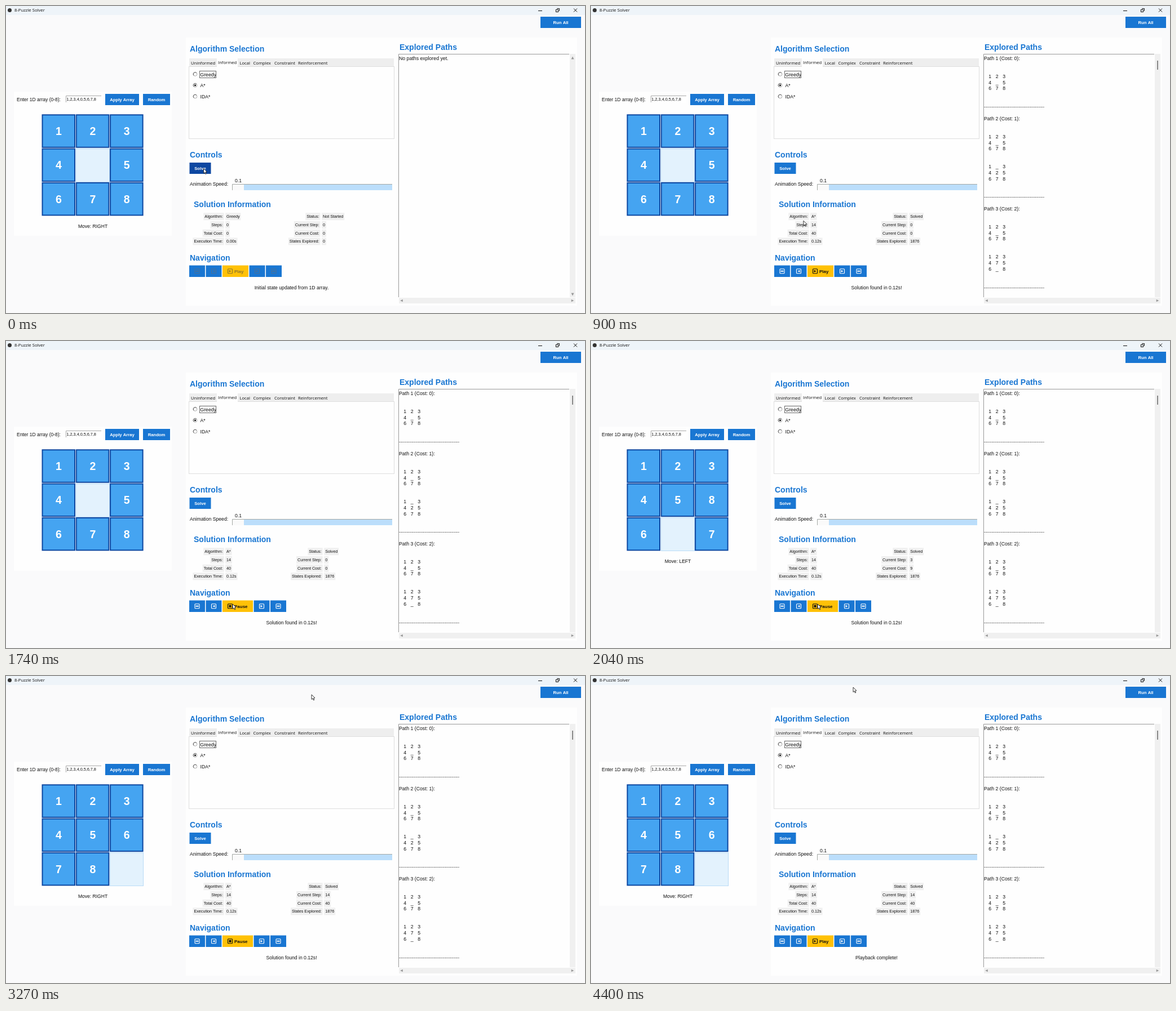
An HTML page with a canvas that plays this animation: 1027x545 px, repeating every 4.43 s.

```html
<!DOCTYPE html>
<html lang="en">
<head>
<meta charset="utf-8">
<title>8-Puzzle Solver</title>
<style>
  html, body { margin: 0; width: 100%; height: 100%; overflow: hidden; background: #fafafb; }
  canvas { display: block; }
</style>
</head>
<body>
<canvas id="stage" width="1027" height="545"></canvas>
<script>
const ctx = document.getElementById('stage').getContext('2d');

const LOOP = 4430, RELEASED = 200, SOLVED = 260, PLAY = 1655, STEP = 110, DONE = 3345;
const BLUE = '#1976d2', NAVY = '#0d47a1', AMBER = '#ffc107', GREY = '#f0f0f0', INK = '#111';
const ARIAL = '"Liberation Sans", Arial, sans-serif';
const UI = '"Open Sans", "Noto Sans", sans-serif';

// Each move shifts the blank by an offset and has its own cost.
const MOVES = {
  U: { name: 'UP', shift: -3, cost: 1 },
  D: { name: 'DOWN', shift: 3, cost: 2 },
  L: { name: 'LEFT', shift: -1, cost: 3 },
  R: { name: 'RIGHT', shift: 1, cost: 4 }
};
const SOLUTION = 'RDLLURDRULLDRR';

// time, x, y of the pointer tip
const POINTER = [
  [0, 350.5, 288.5], [200, 350.5, 288.5], [450, 351.5, 294.5], [650, 351.5, 294.5],
  [1150, 402, 467], [2780, 402, 467], [3200, 542, 33], [3400, 542, 33], [3900, 465, 20]
];

function rect(x, y, w, h, fill) {
  ctx.fillStyle = fill;
  ctx.fillRect(x, y, w, h);
}

function frame(x, y, w, h, color, dash = []) {
  ctx.strokeStyle = color;
  ctx.lineWidth = 1;
  ctx.setLineDash(dash);
  ctx.strokeRect(x + .5, y + .5, w - 1, h - 1);
  ctx.setLineDash([]);
}

function path(points, color, width = 1, fill) {
  ctx.beginPath();
  points.forEach(([x, y]) => ctx.lineTo(x, y));
  if (fill) {
    ctx.closePath();
    ctx.fillStyle = fill;
    ctx.fill();
  }
  if (color) {
    ctx.strokeStyle = color;
    ctx.lineWidth = width;
    ctx.stroke();
  }
}

function disc(x, y, r, fill, stroke) {
  ctx.beginPath();
  ctx.arc(x, y, r, 0, 7);
  ctx.fillStyle = fill;
  ctx.fill();
  if (stroke) {
    ctx.strokeStyle = stroke;
    ctx.lineWidth = 1;
    ctx.stroke();
  }
}

// y is the middle of the capital letters
function text(str, x, y, { size = 8.65, color = INK, align = 'left', bold = false, family = ARIAL } = {}) {
  ctx.font = `${bold ? 'bold ' : ''}${size}px ${family}`;
  ctx.textAlign = align;
  ctx.fillStyle = color;
  ctx.fillText(str, x, y + size * .358);
}

const heading = (str, x, y) => text(str, x, y, { size: 14, color: BLUE, bold: true });

function button(label, x, y, w, fill = BLUE) {
  rect(x, y, w, 20, fill);
  text(label, x + w / 2, y + 10, { size: 7.7, color: '#fff', bold: true, align: 'center' });
}

function cell(str, x, y, align) {
  ctx.font = `7.2px ${ARIAL}`;
  const w = ctx.measureText(str).width;
  rect((align === 'right' ? x - w : x) - 2, y - 6.5, w + 4, 13, GREY);
  text(str, x, y, { size: 7.2, align });
}

function triangle(x, y, dx, dy, r, color) {
  path([[x + dx * r, y + dy * r], [x - dx * r + dy * r, y - dy * r + dx * r],
        [x - dx * r - dy * r, y - dy * r - dx * r]], null, 0, color);
}

function icon(kind, x, y, color) {
  ctx.beginPath();
  ctx.roundRect(x - 4, y - 4, 8, 8, 1);
  ctx.strokeStyle = color;
  ctx.lineWidth = 1.1;
  ctx.stroke();
  if (kind === 'end') rect(x - 2.5, y - 1, 5, 2, color);
  if (kind === 'stop') rect(x - 2, y - 2, 4, 4, color);
  if (kind === 'back') triangle(x, y, -1, 0, 2, color);
  if (kind === 'next') triangle(x, y, 1, 0, 2, color);
}

function stateAt(step) {
  const board = [...'123405678'];
  let cost = 0, move = '';
  for (const key of SOLUTION.slice(0, step)) {
    const from = board.indexOf('0'), to = from + MOVES[key].shift;
    [board[from], board[to]] = [board[to], board[from]];
    cost += MOVES[key].cost;
    move = MOVES[key].name;
  }
  return { board, cost, move };
}

function drawWindow() {
  rect(0, 0, 1027, 545, '#fafafb');
  rect(0, 0, 1027, 16, '#eef4f9');
  disc(6.5, 7.5, 3.5, '#333');
  text('8-Puzzle Solver', 15, 7.7, { size: 7.7, family: UI });
  path([[944, 8.5], [951, 8.5]], INK);
  frame(975, 6, 5, 5, INK);
  path([[977, 4.5], [981.5, 4.5], [981.5, 9]], INK);
  path([[1007, 4.5], [1013, 10.5]], INK);
  path([[1013, 4.5], [1007, 10.5]], INK);
  rect(14, 152, 280, 256, '#fefefe');
  rect(319, 56, 694, 476, '#fefefe');
  button('Run All', 948, 19, 72);
}

function drawBoard({ board, move }) {
  text('Enter 1D array (0-8):', 19, 166, { size: 8.5 });
  rect(106, 159, 63, 13, '#fff');
  path([[106.5, 171], [106.5, 159.5], [169, 159.5]], '#a8a8a8');
  text('1,2,3,4,0,5,6,7,8', 107.5, 165.5, { size: 7.25 });
  button('Apply Array', 176, 156, 60);
  button('Random', 243, 156, 48);

  board.forEach((digit, i) => {
    const x = 63.5 + i % 3 * 60.3, y = 192.3 + Math.floor(i / 3) * 60.3;
    if (digit === '0') {
      rect(x, y, 60, 60, '#e3f2fd');
      frame(Math.round(x), Math.round(y), 60, 60, '#90c4f0', [1, 1]);
      return;
    }
    rect(x, y, 59.5, 59.5, NAVY);
    rect(x + 2, y + 2, 55.5, 55.5, '#45a4f1');
    text(digit, x + 30, y + 29.8, { size: 19.5, color: '#fff', bold: true, align: 'center' });
  });
  if (move) text('Move: ' + move, 154, 390.5, { align: 'center', size: 8.55 });
}

function drawSelection() {
  heading('Algorithm Selection', 326, 75.5);
  rect(325, 93, 363, 14, '#eee');
  frame(324, 107, 365, 129, '#dedede');
  rect(374, 92, 37, 16, '#fefefe');
  [['Uninformed', 328], ['Informed', 376], ['Local', 414.5], ['Complex', 438.5],
   ['Constraint', 476], ['Reinforcement', 518]].forEach(([name, x]) =>
    text(name, x, name === 'Informed' ? 100.3 : 101.5, { size: 7.65, family: UI }));
  ['Greedy', 'A*', 'IDA*'].forEach((name, i) => {
    const y = 121.5 + i * 19.8;
    disc(335.5, y - .5, 3.3, '#fff', '#aaa');
    ctx.beginPath();
    ctx.arc(335.5, y - .5, 3.3, 2.4, 5.5);
    ctx.strokeStyle = '#555';
    ctx.stroke();
    if (i === 1) disc(335.5, y - .5, 1.6, INK);
    text(name, 344.5, y);
  });
  frame(343, 115, 30, 13, '#666');
}

function drawControls(pressed) {
  heading('Controls', 326, 263.5);
  button('Solve', 325.5, 278, 38, pressed ? NAVY : BLUE);
  text('Animation Speed:', 326, 315.5);
  text('0.1', 412, 310, { align: 'center' });
  rect(401, 316, 284, 11, '#bbdefb');
  rect(402, 317, 20, 10, '#fafafa');
  path([[401.5, 327], [401.5, 316.5], [685, 316.5]], '#a5a9a5');
}

function drawInfo(solved, step, cost) {
  heading('Solution Information', 333, 351.5);
  const rows = solved
    ? [['A*', 'Solved'], ['14', step], ['40', cost], ['0.12s', '1876']]
    : [['Greedy', 'Not Started'], ['0', 0], ['0', 0], ['0.00s', '0']];
  const labels = [['Algorithm:', 'Status:'], ['Steps:', 'Current Step:'],
                  ['Total Cost:', 'Current Cost:'], ['Execution Time:', 'States Explored:']];
  const column = solved ? 559.7 : 555.5;
  rows.forEach(([left, right], i) => {
    const y = 373.8 + i * 14.7;
    cell(labels[i][0], 384.7, y, 'right');
    cell(left, 391, y, 'left');
    cell(labels[i][1], column, y, 'right');
    cell(String(right), column + 6.5, y, 'left');
  });
}

function drawNavigation(solved, playing, message) {
  heading('Navigation', 326, 446.5);
  const wide = playing ? 54 : 46, after = 384 + wide + 1.5;
  const light = solved ? '#fff' : '#4b7196', dark = solved ? INK : '#8a7430';
  [['end', 325], ['back', 354.5], ['next', after], ['end', after + 29.5]].forEach(([kind, x]) => {
    rect(x, 460.5, 28, 20.5, BLUE);
    icon(kind, x + 14, 470.7, light);
  });
  rect(384, 460.5, wide, 20.5, AMBER);
  icon(playing ? 'stop' : 'next', 397.5, 470.7, dark);
  text(playing ? 'Pause' : 'Play', 405, 470.7, { size: 8, color: dark, bold: true });
  text(message, 506.5, 500, { align: 'center' });
}

function drawPaths(solved) {
  heading('Explored Paths', 698, 72.5);
  rect(696, 85, 304, 432, '#fefefe');
  path([[696.5, 517], [696.5, 85.5], [999, 85.5]], '#999');
  rect(1000, 85, 10, 432, GREY);
  rect(697, 518, 313, 10, GREY);
  triangle(701.5, 523, -1, 0, 2.3, '#999');
  triangle(1005, 523, 1, 0, 2.3, '#999');
  if (!solved) {
    text('No paths explored yet.', 697, 92.7, { size: 8.75 });
    triangle(1005, 92, 0, -1, 2.5, '#999');
    triangle(1005, 512, 0, 1, 2.5, '#999');
    return;
  }
  rect(1004, 97, 2, 16, '#888');
  const line = n => 92.9 + n * 10.68;
  const style = { size: 8.75 };
  const grid = (digits, row) => [...digits].forEach((digit, i) =>
    text(digit, 705.3 + i % 3 * 12.5, line(row + Math.floor(i / 3)), style));
  const start = '1234_5678';
  [[0, [start]], [10, [start, '1_3425678']], [25, [start, '1234756_8']]].forEach(([row, boards], i) => {
    text(`Path ${i + 1} (Cost: ${i}):`, 697, line(row), style);
    boards.forEach((board, k) => grid(board, row + 3 + k * 5));
    text('-'.repeat(40), 697, line(row + 3 + boards.length * 5), { size: 8.05 });
  });
}

function drawPointer(t) {
  const next = POINTER.findIndex(p => p[0] > t);
  let [, x, y] = POINTER.at(-1);
  if (next > 0) {
    const [t0, x0, y0] = POINTER[next - 1], [t1, x1, y1] = POINTER[next];
    const u = (t - t0) / (t1 - t0), eased = u * u * (3 - 2 * u);
    x = x0 + (x1 - x0) * eased;
    y = y0 + (y1 - y0) * eased;
  }
  const shape = [[0, 0], [0, 8.5], [2, 6.8], [3.5, 10], [4.8, 9.4], [3.4, 6.3], [6, 6], [0, 0]];
  path(shape.map(([dx, dy]) => [x + dx, y + dy]), '#222', .9, '#fff');
}

function draw(now) {
  const t = now % LOOP;
  const solved = t >= SOLVED, playing = t >= PLAY && t < DONE;
  const step = Math.max(0, Math.min(SOLUTION.length, Math.floor((t - PLAY) / STEP)));
  const state = stateAt(step);
  if (!solved) state.move = 'RIGHT';
  const message = !solved ? 'Initial state updated from 1D array.'
    : t < DONE ? 'Solution found in 0.12s!' : 'Playback complete!';

  drawWindow();
  drawBoard(state);
  drawSelection();
  drawControls(t < RELEASED);
  drawInfo(solved, step, state.cost);
  drawNavigation(solved, playing, message);
  drawPaths(solved);
  drawPointer(t);
}

const began = performance.now();
function tick() {
  draw(performance.now() - began);
  requestAnimationFrame(tick);
}
tick();
</script>
</body>
</html>
```
